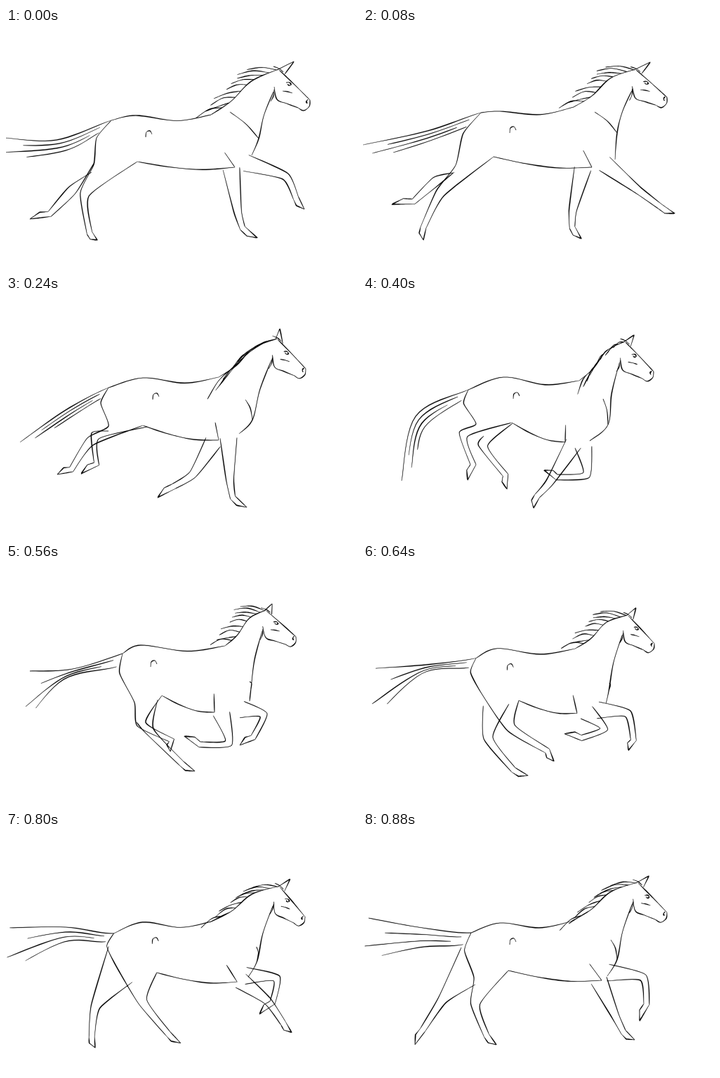
Write an HTML page that moves like this. It is 500 px wide and 343 px high and loops after 0.96 s.

```html
<!DOCTYPE html>
<html lang="en">
<head>
<meta charset="utf-8">
<title>Galloping horse</title>
<style>
html, body { margin: 0; width: 100%; height: 100%; overflow: hidden; background: #fff; }
svg { display: block; width: 100%; height: 100%; }
path { stroke: #000; stroke-width: .25; stroke-linejoin: round; }
</style>
</head>
<body>
<svg viewBox="0 0 500 343"><path id="ink"/></svg>
<script>
const STEP = 80, STEPS = 12;
const KEYS = [0, 1, 3, 5, 7, 9, 11]; // steps of the stride at which joints are keyed

// Joint tracks, one point per key; everything drawn is derived from these
const head = {
  poll: [[388,59], [388,59], [386,61], [373,65], [370,66], [385,79], [391,72]],
  nose: [[433,103], [433,99], [427,104], [414,108], [413,104], [419,123], [433,115]],
  ear: [[410,48], [409,49], [390,47], [386,56], [379,57], [400,68], [407,63]],
  flow: [[-40,18], [-38,12], [-32,48], [-14,34], [-33,8], [-34,14], [-34,26]],
};
const body = {
  withers: [[292,124], [300,113], [303,116], [308,121], [312,117], [292,126], [296,128]],
  croup: [[185,125], [195,119], [195,117], [200,116], [192,116], [192,126], [195,130]],
  dock: [[150,132], [168,121], [146,131], [150,134], [166,128], [154,142], [154,144]],
  buttock: [[125,195], [132,196], [146,186], [161,183], [183,198], [153,175], [158,208]],
  flank: [[187,191], [186,184], [195,185], [212,181], [222,188], [219,201], [207,198]],
  elbow: [[326,199], [326,199], [303,206], [288,209], [297,212], [315,214], [340,212]],
  shoulder: [[319,120], [330,120], [341,148], [342,147], [347,168], [354,168], [353,154]],
  chest: [[360,158], [362,150], [351,177], [349,184], [349,178], [353,182], [362,182]],
  breast: [[350,182], [359,188], [332,197], [323,207], [347,196], [343,204], [348,206]],
};
const farHind = {
  back: [[122,206], [128,207], [146,193], [172,200], [186,226], [153,175], [140,165]],
  front: [[126,192], [130,206], [201,187], [213,182], [216,194], [195,206], [160,218]],
  joint: [[94,232], [104,219], [127,200], [171,214], [204,238], [145,255], [113,240]],
  fetlock: [[62,266], [72,248], [129,240], [203,256], [250,285], [163,298], [85,283]],
  toe: [[34,273], [41,252], [107,254], [205,276], [269,296], [180,306], [74,304]],
};
const nearHind = {
  joint: [[112,238], [110,236], [120,208], [143,198], [193,229], [216,237], [160,246]],
  fetlock: [[119,293], [86,285], [93,248], [157,241], [236,252], [268,282], [176,291]],
  toe: [[130,303], [86,303], [73,255], [149,263], [234,268], [287,296], [190,304]],
};
const foreOne = {
  root: [[321,201], [313,201], [295,209], [314,216], [336,208], [331,211], [336,212]],
  joint: [[330,262], [299,260], [266,255], [318,256], [367,216], [379,222], [359,262]],
  fetlock: [[337,286], [298,285], [239,272], [276,259], [352,248], [405,260], [371,286]],
  toe: [[358,300], [311,301], [216,288], [258,249], [333,259], [411,275], [387,297]],
};
const foreTwo = {
  root: [[342,193], [344,194], [317,203], [300,211], [307,214], [331,209], [349,201]],
  joint: [[398,212], [391,231], [319,262], [266,266], [317,256], [367,216], [399,208]],
  fetlock: [[413,243], [423,255], [323,288], [248,286], [276,258], [350,243], [404,246]],
  toe: [[425,259], [444,265], [343,302], [243,303], [254,246], [327,249], [394,270]],
};
const tail = {
  highMid: [[72,160], [92,147], [85,163], [75,172], [95,150], [85,140], [85,137]],
  highTip: [[-2,157], [0,167], [20,209], [55,264], [34,153], [5,155], [8,123]],
  lowMid: [[85,175], [90,163], [102,167], [88,187], [82,165], [85,153], [80,165]],
  lowTip: [[0,188], [20,185], [52,200], [76,236], [25,229], [2,218], [0,183]],
};

const move = (p, x, y) => [p[0] + x, p[1] + y];
const mix = (p, q, u) => [p[0] + (q[0] - p[0]) * u, p[1] + (q[1] - p[1]) * u];
const unit = (p, q) => {
  const x = q[0] - p[0], y = q[1] - p[1], len = Math.hypot(x, y) || 1;
  return [x / len, y / len];
};
const noise = n => { const v = Math.sin(n * 12.9898) * 43758.5453; return v - Math.floor(v); };

function hermite(a, b, ma, mb, u) {
  const v = u * u, w = v * u;
  return a * (2 * w - 3 * v + 1) + ma * (w - 2 * v + u) + b * (3 * v - 2 * w) + mb * (w - v);
}

// Place of a joint on its closed track
function jointAt(track, step) {
  const n = KEYS.length;
  const time = k => KEYS[(k + n) % n] + STEPS * Math.floor(k / n);
  const key = k => track[(k + n) % n];
  const k = KEYS.findLastIndex(t => t <= step), span = time(k + 1) - time(k);
  const slope = (j, c) => (key(j + 1)[c] - key(j - 1)[c]) / (time(j + 1) - time(j - 1)) * span;
  const u = (step - time(k)) / span;
  return [0, 1].map(c => hermite(key(k)[c], key(k + 1)[c], slope(k, c), slope(k + 1, c), u));
}

const rigAt = (tracks, step) =>
  Object.fromEntries(Object.entries(tracks).map(([name, t]) => [name, jointAt(t, step)]));

// Curve through points; bend 0 gives straight runs, lead skips the first segments
function curve(pts, bend = .5, lead = 0) {
  const out = [], last = pts.length - 1;
  const at = k => pts[Math.max(0, Math.min(last, k))];
  for (let k = lead; k < last; k++) {
    for (let s = 0; s < 10; s++) {
      out.push([0, 1].map(c => {
        const a = at(k)[c], b = at(k + 1)[c];
        if (!bend) return a + (b - a) * s / 10;
        return hermite(a, b, (b - at(k - 1)[c]) * bend, (at(k + 2)[c] - a) * bend, s / 10);
      }));
    }
  }
  return [...out, at(last)];
}

// Brush line with tapered ends and uneven pressure, as a filled outline
let ink = [], step = 0;
function pen(pts, width = 1.2) {
  const last = pts.length - 1, left = [], right = [], seed = noise(ink.length + step * 60) * 7;
  pts.forEach(([x, y], i) => {
    const [dx, dy] = unit(pts[Math.max(0, i - 1)], pts[Math.min(last, i + 1)]);
    const taper = .25 + .75 * Math.sqrt(Math.sin(Math.PI * i / last) + 1e-9);
    const r = width / 2 * taper * (.8 + .35 * Math.sin(seed + i * .35));
    left.push(`${(x - dy * r).toFixed(2)} ${(y + dx * r).toFixed(2)}`);
    right.unshift(`${(x + dy * r).toFixed(2)} ${(y - dx * r).toFixed(2)}`);
  });
  ink.push('M' + [...left, ...right].join('L') + 'Z');
}

// Point beside the middle of a chain a-b-c: r > 0 on the rear side
function beside(a, b, c, r) {
  const u = unit(a, b), v = unit(b, c), [x, y] = unit([0, 0], [u[0] + v[0], u[1] + v[1]]);
  return [b[0] - y * r, b[1] + x * r];
}

function limb(back, front, { joint, fetlock, toe }, girth) {
  const top = mix(back[back.length - 1], front, .5);
  const knee = r => beside(top, joint, fetlock, r), ankle = r => beside(joint, fetlock, toe, r);
  pen(curve([...back, knee(girth), ankle(4)], .3));
  pen(curve([front, knee(-girth), ankle(-4)], .3));
  const heel = beside(fetlock, mix(fetlock, toe, .45), toe, 6);
  pen(curve([ankle(4), heel, toe, ankle(-4)], 0), 1.3);
}

function foreleg(leg) {
  const { root, joint } = leg;
  limb([beside(root, root, joint, 12)], beside(root, root, joint, -12), leg, 5.5);
}

// Head shapes are offsets from the poll, turned and scaled towards the nose
function drawHead({ poll, nose, ear }) {
  const x = nose[0] - poll[0], y = nose[1] - poll[1], size = 45 * 45 + 44 * 44;
  const cos = (x * 45 + y * 44) / size, sin = (y * 45 - x * 44) / size;
  const place = ([a, b]) => move(poll, a * cos - b * sin, a * sin + b * cos);
  const shape = (pts, width) => pen(curve(pts.map(place)), width);
  shape([[1,1], [22,21], [45,44]]);
  shape([[45,44], [44,53], [36,59], [28,55]]);
  shape([[28,55], [12,49], [-2,43], [-6,25]]);
  shape([[-6,29], [-7,38], [-11,46]], 1);
  shape([[11,19], [16,19], [18,22], [15,23], [13,21]], 1.5);
  shape([[42,43], [40,46], [41,49]], 1.8);
  shape([[6,31], [13,32], [20,34]], 1);
  shape([[7,4], [1,-1], [-7,-4]], 1);
  pen(curve([move(poll, -2, 1), ear, place([9,7])], .1));
  return place([-7,32]);
}

function drawMane(crest, flow) {
  for (let k = 0; k < 9; k++) {
    const u = .2 + .78 * k / 8, size = .65 + .5 * noise(k + 3);
    const base = crest[Math.round(u * (crest.length - 1))];
    const dx = flow[0] * size, dy = (flow[1] * (1 - .5 * u) - 10 * u * u) * size;
    pen(curve([base, move(base, dx * .5, dy * .5 - 2 + 5 * noise(k) - 3), move(base, dx, dy)]), 1.1);
  }
}

function drawTail(t, croup, dock, bulge) {
  for (let k = 0; k < 4; k++) {
    const u = k / 3, start = mix(dock, bulge, u * .6);
    const pts = curve([croup, start, mix(t.highMid, t.lowMid, u), mix(t.highTip, t.lowTip, u)], .5, 1);
    pen(pts.slice(k * 2 % 5, pts.length - (k % 2) * 4), 1.15);
  }
}

function drawHorse() {
  const h = rigAt(head, step), b = rigAt(body, step), far = rigAt(farHind, step);
  const throat = drawHead(h);
  const bulge = move(mix(b.dock, b.buttock, .4), -11, 0);
  const dip = move(mix(b.croup, b.withers, .55), 0, 8);
  const crest = curve([b.withers, mix(b.withers, h.poll, .3), move(mix(b.withers, h.poll, .6), 0, -9), h.poll]);

  pen(curve([b.dock, b.croup, dip, b.withers]));
  pen(crest);
  drawMane(crest, h.flow);
  drawTail(rigAt(tail, step), b.croup, b.dock, bulge);

  pen(curve([throat, move(mix(throat, b.chest, .5), -3, 0), b.chest, b.breast]));
  pen(curve([b.shoulder, move(mix(b.shoulder, b.chest, .5), 2, -2), b.chest]), 1);
  pen(curve([move(mix(b.elbow, b.withers, .28), -5, 0), b.elbow]), 1);
  pen(curve([b.flank, move(mix(b.flank, b.elbow, .33), 0, 5), move(mix(b.flank, b.elbow, .67), 0, 6), b.elbow]));
  const hook = [[-4,6], [-3,-1], [2,-3], [5,2]];
  pen(curve(hook.map(([x, y]) => move(b.croup, 18 + x, 25 + y))), 1);

  limb([far.back], far.front, far, 6.5);
  limb([b.dock, bulge, b.buttock], b.flank, rigAt(nearHind, step), 6.5);
  foreleg(rigAt(foreOne, step));
  foreleg(rigAt(foreTwo, step));
}

let shown = -1;
function draw(ms) {
  step = Math.floor(ms / STEP) % STEPS;
  if (step === shown) return;
  shown = step;
  ink = [];
  drawHorse();
  document.getElementById('ink').setAttribute('d', ink.join(''));
}

function tick(now) {
  draw(now);
  requestAnimationFrame(tick);
}
draw(0);
requestAnimationFrame(tick);
</script>
</body>
</html>
```
